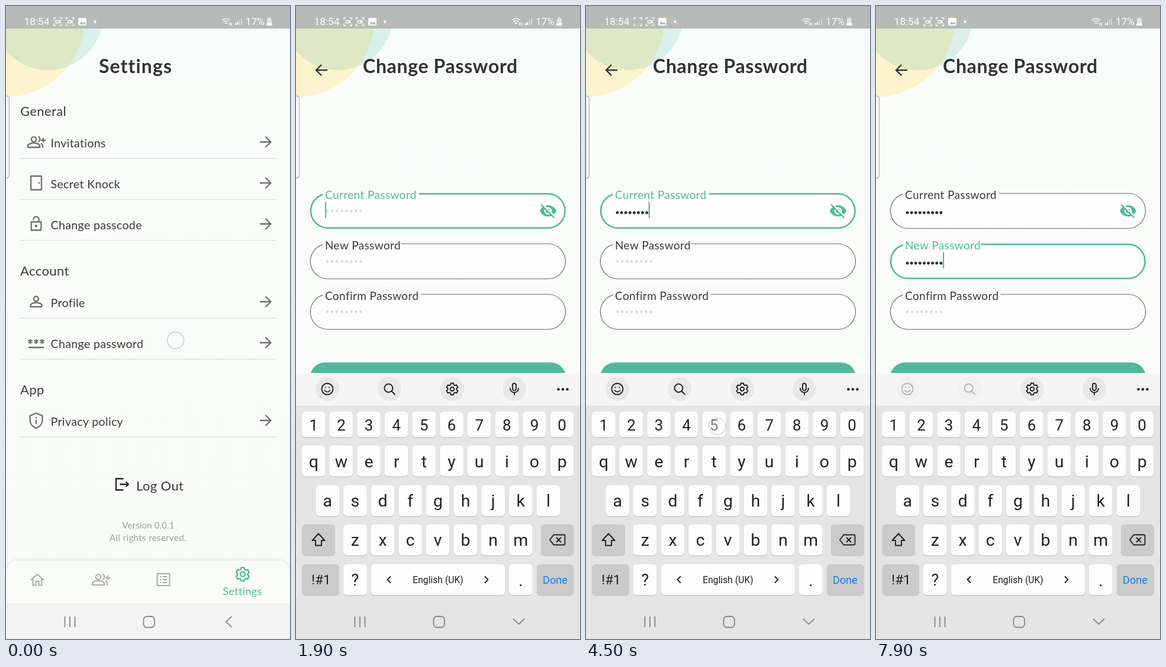
An HTML page that plays this animation: 480 by 1066 pixels, repeating every 8 s.

```html
<!DOCTYPE html>
<html lang="en">
<head>
<meta charset="utf-8">
<title>Change password</title>
<style>
html, body { margin: 0; width: 100%; height: 100%; overflow: hidden; background: #f9fbf8; }
svg { display: block; width: 480px; height: 1066px; }
text { font-family: Lato, sans-serif; white-space: pre; }
.r { font-family: Roboto, sans-serif; }
</style>
</head>
<body>
<svg id="stage" viewBox="0 0 480 1066"></svg>
<script>
const LOOP = 8000, GREEN = '#50b99b', INK = '#3a3a3a', GREY = '#6f706f';

// ---- drawing helpers, each returns SVG markup ----
const text = (x, y, s, size, fill = INK, more = '') =>
  `<text x="${x}" y="${y}" font-size="${size}" fill="${fill}" ${more}>${s}</text>`;
const mid = 'text-anchor="middle" ';
const roboto = mid + 'class="r"';
const spaced = n => `letter-spacing="${n}" `;
const rect = (x, y, w, h, r, fill, more = '') =>
  `<rect x="${x}" y="${y}" width="${w}" height="${h}" rx="${r}" fill="${fill}" ${more}/>`;
const dot = (x, y, r, fill, more = '') => `<circle cx="${x}" cy="${y}" r="${r}" fill="${fill}" ${more}/>`;
const line = (x, y, d, color = GREY, w = 2, more = '') =>
  `<path transform="translate(${x} ${y})" d="${d}" fill="none" stroke="${color}" stroke-width="${w}" ${more}/>`;
const group = (id, s) => `<g id="${id}">${s}</g>`;
const ring = (x, y, r) => `M${x - r},${y}a${r},${r} 0 1 0 ${2 * r},0a${r},${r} 0 1 0 ${-2 * r},0z`;
const join = 'stroke-linejoin="round" stroke-linecap="round"';

function gear(R) {
  const pts = [];
  for (let i = 0; i < 6; i++)
    for (const [da, k] of [[-21, .76], [-13, 1], [13, 1], [21, .76]]) {
      const a = (i * 60 - 90 + da) * Math.PI / 180;
      pts.push((R * k * Math.cos(a)).toFixed(1) + ',' + (R * k * Math.sin(a)).toFixed(1));
    }
  return 'M' + pts.join('L') + 'z' + ring(0, 0, R * .33);
}

const icons = {
  people: ring(-4, -4.5, 4.2) + 'M-14,9v-2.5c0,-3.2 6,-4.8 10,-4.8s10,1.6 10,4.8v2.5z' +
    'M3.5,-9a5,5 0 0 1 0,9M8,2.5q3,1.5 3,4v3M12,-7v8M8,-3h8',
  door: 'M-9,-11.5h18v23h-18zM3.5,0h2.6',
  lock: 'M-8.3,-3.5h16.6v14h-16.6zM4.7,-3.5v-4a4.7,4.7 0 0 0 -9.4,0v.5' + ring(0, 3.5, 1),
  person: ring(0, -5, 4) + 'M-9.5,8.5v-2.5c0,-3 6,-4.5 9.5,-4.5s9.5,1.5 9.5,4.5v2.5z',
  stars: [-10, 0, 10].map(x => `M${x},-6v8M${x - 3.6},-4l7.2,4M${x + 3.6},-4l-7.2,4`).join('') + 'M-13,8h26',
  shield: 'M0,-12.5l10.5,4.6v7.4c0,6.3 -4.5,11.5 -10.5,13.5c-6,-2 -10.5,-7.2 -10.5,-13.5v-7.4zM0,-1v7M0,-5.8v2.4',
  arrow: 'M-9.5,0h18M0,-9l9,9l-9,9',
  home: 'M-11,1l11,-10l11,10M-7.5,-1.5v11h5v-6.5h5v6.5h5v-11',
  list: 'M-10.5,-10h21v20h-21zM-6,-5h2.4M-6,0h2.4M-6,5h2.4M-1,-5h7M-1,0h7M-1,5h7',
  logout: 'M3,-9.5h-12.5v19h12.5M-3,0h14M7,-4.2l4.3,4.2l-4.3,4.2',
  eyeOff: 'M12 7c2.76 0 5 2.24 5 5 0 .65-.13 1.26-.36 1.83l2.92 2.92c1.51-1.26 2.7-2.89 3.43-4.75-1.73-4.39-6-7.5-11-7.5-1.4 0-2.74.25-3.98.7l2.16 2.16C10.74 7.13 11.35 7 12 7zM2 4.27l2.74 2.74C3.08 8.3 1.78 10.02 1 12c1.73 4.39 6 7.5 11 7.5 1.55 0 3.03-.3 4.38-.84L19.73 22 21 20.73 3.27 3 2 4.27zM7.53 9.8l1.55 1.55c-.05.21-.08.43-.08.65 0 1.66 1.34 3 3 3 .22 0 .44-.03.65-.08l1.55 1.55c-.67.33-1.41.53-2.2.53-2.76 0-5-2.24-5-5 0-.79.2-1.53.53-2.2zm4.31-.78l3.15 3.15.02-.16c0-1.66-1.34-3-3-3z'
};

// ---- fixed layers ----
function backdrop() {
  return `<defs><linearGradient id="bg" x2="0" y2="1"><stop stop-color="#f5fefd"/><stop offset=".12" stop-color="#fafcfa"/><stop offset="1" stop-color="#f9fbf8"/></linearGradient>
    <filter id="soft" x="-20%" y="-20%" width="140%" height="140%"><feDropShadow dx="0" dy="1" stdDeviation="2.5" flood-opacity=".25"/></filter>
    <filter id="haze" x="-20%" y="-20%" width="140%" height="140%"><feDropShadow dx="0" dy="0" stdDeviation="4" flood-opacity=".12"/></filter></defs>` +
    rect(0, 0, 480, 1066, 0, 'url(#bg)') +
    dot(0, 20, 133, '#fdf3cd') + dot(71, 15, 93, 'rgba(82,186,156,.19)');
}

function statusBar() {
  const frame = 'M-6.5,-3v-3.5h3.5M3,-6.5h3.5v3.5M6.5,3v3.5h-3.5M-3,6.5h-3.5v-3.5';
  const cam = 'M-3.5,-2h5v4h-5zM1.5,0l2.5,-2v4z';
  return rect(0, 0, 480, 38, 0, '#b7bab8') +
    text(30.5, 32, '18:54', 17.2, '#fff', 'class="r"') +
    line(87.5, 26.5, frame, '#fff', 1.3) + group('rec', line(87.5, 26.5, cam, '#fff', 1.3)) +
    line(108, 26.5, frame + cam, '#fff', 1.3) +
    rect(122, 20, 14, 13, 2, '#fff') + `<path d="M124,31l3.5,-5l2.5,3l2,-2.5l3,4.5z" fill="#b7bab8"/>` +
    dot(150.5, 26.5, 2.2, '#fff') +
    line(372, 31, 'M-7,-7a10,10 0 0 1 14,0M-4.6,-4.2a6.5,6.5 0 0 1 9.2,0M-2,-1.6a3,3 0 0 1 4,0M6,-3v5M9,-3v5', '#fff', 1.4) +
    line(387, 32, 'M1,0v-3M4,0v-5', '#fff', 2) + line(387, 32, 'M7.5,0v-8M11,0v-11', '#d6d8d7', 2) +
    text(405, 32, '17%', 17.2, '#fff', 'class="r"') +
    rect(441, 21, 8, 12, 1.5, '#e4e5e4') + rect(443, 19.5, 4, 2, 0, '#e4e5e4') + rect(440, 29, 10, 4, 1, '#fff');
}

function settings() {
  const head = (y, s) => text(24, y, s, 22, INK, spaced(.4));
  const row = (y, icon, s) =>
    line(51, y - 9, icons[icon], GREY, 2.3, 'stroke-linejoin="round"') +
    text(75.5, y, s, 19.6, INK, spaced(.33)) +
    line(438.5, y - 9, icons.arrow, GREY, 2.3) + rect(24, y + 18, 432, 1.3, 0, '#dcdedc');
  const tab = (x, icon) => line(x, 966, icons[icon], '#a9aba9', 2);
  return text(219, 113, 'Settings', 32, '#333', mid + spaced(1.1) + 'font-weight="700"') +
    head(185, 'General') + row(238, 'people', 'Invitations') + row(307, 'door', 'Secret Knock') +
    row(376, 'lock', 'Change passcode') +
    head(454, 'Account') + row(507, 'person', 'Profile') + row(576, 'stars', 'Change password') +
    head(654, 'App') + row(707, 'shield', 'Privacy policy') +
    line(195.5, 805.5, icons.logout, '#222', 2.3) + text(220, 816, 'Log Out', 22, INK, spaced(.4)) +
    text(240.5, 880, 'Version 0.0.1', 15, '#9c9e9c', mid + spaced(.15)) +
    text(240, 901, 'All rights reserved.', 15, '#9c9e9c', mid + spaced(.4)) +
    rect(0, 934, 480, 100, 22, '#fafcf8', 'filter="url(#haze)"') +
    tab(53, 'home') + tab(160, 'people') + tab(266, 'list') +
    line(400, 957, gear(11.6), GREEN, 2.3, join) +
    text(399.5, 992, 'Settings', 18, GREEN, mid + spaced(.3));
}

function passwordPage() {
  return line(43, 108, 'M10,0h-19M0,-9l-9,9l9,9', '#333', 2.4) +
    text(244, 113, 'Change Password', 32, '#333', mid + spaced(.65) + 'font-weight="700"') +
    group('fields', '') +
    `<path transform="translate(410.8 329.8) scale(1.27)" d="${icons.eyeOff}" fill="${GREEN}"/>` +
    rect(24, 600.3, 432, 49.7, 24.8, GREEN) +
    text(240, 632, 'Change Password', 18, '#fff', roboto + ' font-weight="500"') +
    text(240, 690, 'Forgot password?', 18, GREEN, mid + spaced(.2));
}

const keys = {};
function keyboard() {
  const cap = (x, y, w, h, fill = '#fdfdfd') => rect(x, y + 1.5, w, h, 6, '#c9c9c9') + rect(x, y, w, h, 6, fill);
  const dark = '#cbcbcb', ink = '#222';
  let s = rect(0, 618, 480, 448, 0, '#e5e5e5') + rect(0, 618, 480, 55, 0, '#f5f5f5');
  const tool = (x, d) => dot(x, 645, 20, '#e8e8e8') + line(x, 645, d, ink, 1.9, join);
  s += group('muted',
    tool(53, ring(0, 0, 9.5) + 'M-3.3,-2.8v.4M3.3,-2.8v.4M-4.5,2.4q4.5,5 9,0') + tool(158, ring(-1.5, -1.5, 7) + 'M3.5,3.5l5.5,5.5'));
  s += tool(264, gear(10)) +
    tool(369, 'M-3,-6.5a3,3 0 0 1 6,0v6a3,3 0 0 1 -6,0zM-7,-1a7,7 0 0 0 14,0M0,6v3.5') +
    [443.5, 451, 458.5].map(x => dot(x, 645.5, 2.3, ink)).join('');
  const rows = [['1234567890', 10, 683, 43, 32, 26], ['qwertyuiop', 10, 740, 52, 37, 28.5],
    ['asdfghjkl', 33.5, 807, 52, 36, 28.5], ['zxcvbnm', 80, 873, 52, 36, 28.5]];
  for (const [chars, x0, y, h, base, size] of rows)
    [...chars].forEach((c, i) => {
      const x = x0 + i * 46.65;
      keys[c] = { x, y, h, label: text(x + 19.8, y + base, c, size, ink, roboto) };
      s += cap(x, y, 39.5, h) + keys[c].label;
    });
  return s + cap(10, 873, 56, 52, dark) + cap(414, 873, 56, 52, dark) +
    line(38, 899, 'M0,-10.5l10.5,11.5h-5.5v8.5h-10v-8.5h-5.5z', ink, 1.9, join) +
    line(442, 899, 'M-13,0l6.5,-8.5h17.5q1.5,0 1.5,1.5v14q0,1.5 -1.5,1.5h-17.5zM-1.5,-3.5l7,7M5.5,-3.5l-7,7', ink, 1.9, join) +
    cap(10, 940, 63, 52, dark) + text(42.5, 974, '!#1', 22.5, ink, roboto) +
    cap(80, 940, 39.5, 52) + text(100, 976, '?', 27, ink, roboto) +
    cap(127, 940, 226, 52) + text(240, 972, 'English (UK)', 15.7, ink, roboto) +
    line(157, 966, 'M3,-5.5l-5.5,5.5l5.5,5.5', ink) + line(322, 966, 'M-3,-5.5l5.5,5.5l-5.5,5.5', ink) +
    cap(360, 940, 39.5, 52) + text(380, 977, '.', 28, ink, roboto) +
    cap(407, 940, 63, 52, dark) + text(438, 973, 'Done', 18.2, '#1a7ce6', roboto);
}

function navBar() {
  const c = '#878787';
  return rect(0, 1006, 480, 60, 0, '#f4f4f4', 'id="bar"') +
    line(108, 1037, 'M-8.5,-9v18M0,-9v18M8.5,-9v18', c, 1.8) +
    rect(232.5, 1028, 18.5, 18.5, 5.5, 'none', `stroke="${c}" stroke-width="1.8"`) +
    group('back', line(377, 1037, 'M4.5,-9l-9.5,9l9.5,9', c, 1.8)) +
    group('hide', line(376.5, 1036.5, 'M-9.5,-4.5l9.5,9l9.5,-9', c, 1.8));
}

const stage = document.getElementById('stage');
stage.innerHTML = backdrop() + group('home', settings()) + group('page', passwordPage()) +
  rect(-12, 151.5, 17.5, 138.5, 5, '#f8f8f8', 'stroke="#b4b5b4" stroke-width="1.3"') +
  statusBar() + group('board', keyboard()) + navBar() + group('touch', '');
const el = id => document.getElementById(id);
const [rec, home, page, fields, board, muted, bar, back, hide, touch] =
  ['rec', 'home', 'page', 'fields', 'board', 'muted', 'bar', 'back', 'hide', 'touch'].map(el);

// ---- timeline ----
const FOCUS = 1450, NEXT = 5200;
// key presses: start, character, finger offset from the key centre
const presses = [
  [2300, 't', -3, 8], [2650, 'y', -7, 20], [2850, 'a', -19, 34], [3350, '1', 0, -5], [3650, '2', 2, 2],
  [3850, '3', 3, 2], [4050, '4', 4, 3], [4270, '5', 5.6, 3.5], [4600, '6', 4, 3],
  [5650, 'a', -12, 16], [5950, 'y', -6, 14], [6250, 'a', -12, 18], [6450, 't', -3, 10], [6670, '1', -1, -5.5],
  [6930, '2', 1, 0], [7120, '3', 2, 1], [7310, '4', 3, 2], [7500, '5', 5, 3]
].map(([down, key, dx, dy]) => {
  const k = keys[key];
  return { down, up: down + 110, key, x: k.x + 19.8 + dx, y: k.y + k.h / 2 + dy };
});
const taps = [{ down: -200, up: -50, x: 286.5, y: 563 }, { down: 1400, up: 1530, x: 293, y: 354 },
  { down: 5090, up: 5200, x: 285, y: 436 }, ...presses];

const clamp = v => Math.max(0, Math.min(1, v));

function field(y, label, gap, focused, count, cursor) {
  const color = focused ? GREEN : GREY, inset = focused ? .8 : 0, r = 29.5 - inset;
  let s = rect(24.5, y, 431, 59, 29.5, '#fefefe') +
    line(0, y + inset, `M${gap},0H426a${r},${r} 0 0 1 0,${2 * r}H54a${r},${r} 0 0 1 -8.5,${1.2 - 2 * r}`, color, focused ? 2.5 : 1.2) +
    text(49, y + (focused ? 9.5 : 9), label, 19, focused ? GREEN : INK, spaced(.4));
  if (!count) s += text(49, y + 41, '********', 19, '#b4b6b4', 'font-weight="300"');
  for (let i = 0; i < count; i++) s += dot(53 + 7.1 * i, y + 32.5, 2.5, '#333');
  if (cursor) s += rect(49 + 7.1 * count, y + 14.5, 2.2, 27, 0, GREEN);
  return s;
}

function drawFields(t) {
  const done = presses.filter(p => p.up <= t);
  const first = done.filter(p => p.up < NEXT).length, second = done.length - first;
  const last = Math.max(FOCUS, t >= NEXT ? NEXT : 0, ...done.map(p => p.up));
  const blink = t >= FOCUS && (t - last) % 1000 < 500;
  fields.innerHTML =
    field(315.5, 'Current Password', 208, t >= 1560 && t < NEXT, first, blink && t < NEXT) +
    field(400.5, 'New Password', 177.5, t >= NEXT, second, blink && t >= NEXT) +
    field(485.5, 'Confirm Password', 210.5, false, 0, false);
}

function drawTouch(t) {
  let s = '';
  for (const p of presses) if (t >= p.down && t < p.up) {
    const k = keys[p.key], top = k.y - 102;
    s += rect(k.x, k.y, 39.5, k.h, 6, '#a6a6a6') + `<g opacity=".75">${k.label}</g>` +
      rect(k.x - 16.7, top, 73, 93, 9, '#fcfcfc', 'filter="url(#soft)"') +
      text(k.x + 19.8, top + 63, p.key, 41, '#222', roboto);
  }
  for (const p of taps) if (t >= p.down) {
    const a = 1 - clamp((t - p.up) / 300);
    if (a) s += dot(p.x, p.y, 14, 'rgba(250,252,255,.75)', `stroke="rgba(150,155,165,.5)" stroke-width="1.8" opacity="${a}"`);
  }
  touch.innerHTML = s;
}

function draw(t) {
  const swap = clamp((t - 250) / 200), slide = 1 - (1 - clamp((t - 1600) / 280)) ** 3;
  const typing = t >= 1600, beat = t % 1000;
  home.setAttribute('opacity', 1 - swap);
  page.setAttribute('opacity', swap);
  rec.setAttribute('opacity', beat >= 150 && beat < 650 ? 0 : 1);
  board.setAttribute('transform', `translate(0 ${448 * (1 - slide)})`);
  muted.setAttribute('opacity', t >= NEXT + 50 ? .3 : 1);
  bar.setAttribute('fill', typing ? '#e5e5e5' : '#f4f4f4');
  back.setAttribute('opacity', typing ? 0 : 1);
  hide.setAttribute('opacity', typing ? 1 : 0);
  drawFields(t);
  drawTouch(t);
}

const start = performance.now();
function tick(now) {
  draw(Math.max(0, now - start) % LOOP);
  requestAnimationFrame(tick);
}
draw(0);
requestAnimationFrame(tick);
</script>
</body>
</html>
```
